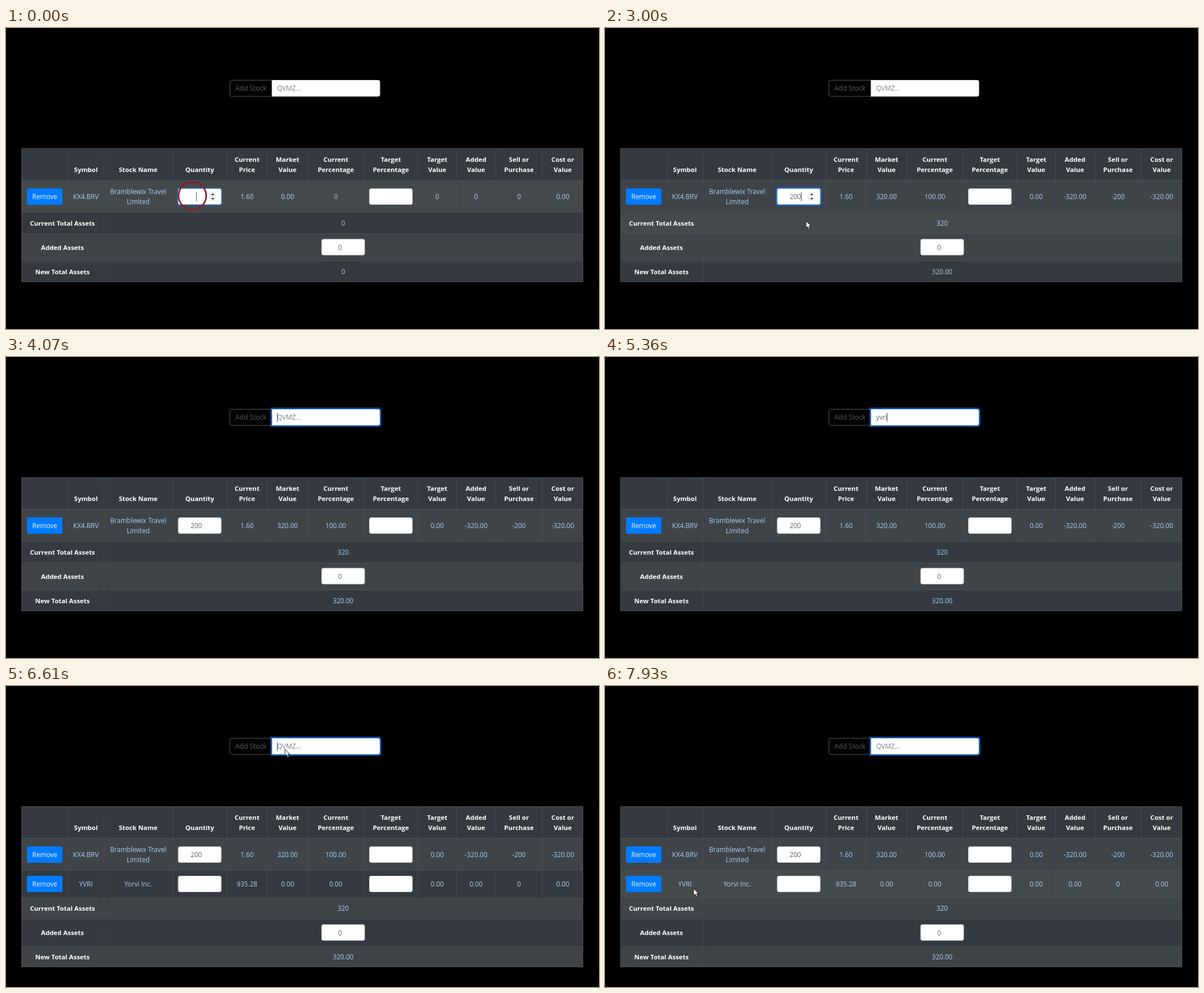
An HTML page with a canvas that plays this animation: 1050x533 px, repeating every 8 s.

```html
<!DOCTYPE html>
<html lang="en">
<head>
<meta charset="utf-8">
<title>Portfolio table</title>
<style>
html, body { margin: 0; width: 100%; height: 100%; overflow: hidden; background: #000; }
canvas { display: block; }
</style>
</head>
<body>
<canvas id="stage" width="1050" height="533"></canvas>
<script>
const ctx = document.getElementById('stage').getContext('2d');
const LOOP = 8000, BLINK = 535;
const FONT = '"Open Sans", "Noto Sans", sans-serif';
const BASE = '#343a40', STRIPE = '#3f4449', HOVER = '#444a4c', LINE = '#454c53';
const CELL = '#a9cdf2', INK = '#5d646b';

const cols = [27, 110, 173, 295, 391, 462.5, 534.5, 633.5, 729.5, 797.5, 867, 949.5, 1022];
const heads = ['', 'Symbol', 'Stock Name', 'Quantity', 'Current|Price', 'Market|Value',
  'Current|Percentage', 'Target|Percentage', 'Target|Value', 'Added|Value',
  'Sell or|Purchase', 'Cost or|Value'];
const mid = i => (cols[i] + cols[i + 1]) / 2;

// Typed text over time: [ms, content]
const qtyKeys = [[-35, ''], [1610, '2'], [1750, '20'], [1890, '200']];
const searchKeys = [[3925, ''], [4820, 'y'], [5060, 'yv'], [5210, 'yvr'], [5360, 'yvri'], [6255, '']];
// Pointer path: [ms, x, y]
const path = [[2820, 330, 297], [2900, 343, 322], [3000, 356, 342], [3140, 364, 341],
  [3330, 405, 252], [3500, 450, 154], [3610, 475, 126], [3750, 494, 112], [7040, 494, 112],
  [7220, 432, 190], [7420, 320, 306], [7640, 205, 372], [7820, 165, 367], [7910, 157, 359]];

const clamp = v => Math.max(0, Math.min(1, v));
const latest = (keys, t) => keys.filter(k => k[0] <= t).pop() || keys[0];
const caretOn = (key, t) => Math.floor((t - key[0]) / BLINK) % 2 === 0;

function pointerAt(t) {
  const n = path.findIndex(p => p[0] > t);
  if (n === 0) return path[0].slice(1);
  if (n < 0) return path[path.length - 1].slice(1);
  const a = path[n - 1], b = path[n], k = (t - a[0]) / (b[0] - a[0]);
  return [a[1] + (b[1] - a[1]) * k, a[2] + (b[2] - a[2]) * k];
}

function rect(x, y, w, h, fill) {
  ctx.fillStyle = fill;
  ctx.fillRect(x, y, w, h);
}

function box(x, y, w, h, r, fill, stroke, width = 1) {
  ctx.beginPath();
  ctx.roundRect(x, y, w, h, r);
  if (fill) { ctx.fillStyle = fill; ctx.fill(); }
  if (stroke) { ctx.strokeStyle = stroke; ctx.lineWidth = width; ctx.stroke(); }
}

function text(s, x, y, color = CELL, { bold, align = 'center', size = 11.7 } = {}) {
  ctx.font = `${bold ? 700 : 400} ${bold ? 11.45 : size}px ${FONT}`;
  ctx.textAlign = align;
  ctx.fillStyle = color;
  const lines = s.split('|');
  lines.forEach((l, i) => ctx.fillText(l, x, y + 4.2 + (i - (lines.length - 1) / 2) * 18.4));
  return ctx.measureText(s).width;
}

function caret(x, y) {
  rect(Math.round(x), y - 8, 1, 16, '#4a4f55');
}

function field(x, y, w, h, r, focus) {
  if (focus > 0) box(x - 1, y - 1, w + 2, h + 2, r, null, `rgba(20,105,225,${0.6 * focus})`, 3);
  box(x + .5, y + .5, w - 1, h - 1, r, '#fff', focus > 0 ? '#80bdff' : '#ced4da');
}

function spinner(x, y) {
  rect(x - 6, y - 8, 12, 16, '#efefef');
  ctx.fillStyle = '#4d4d4d';
  for (const d of [-1, 1]) {
    ctx.beginPath();
    ctx.moveTo(x - 3, y + d * 2.5);
    ctx.lineTo(x + 3, y + d * 2.5);
    ctx.lineTo(x, y + d * 6);
    ctx.fill();
  }
}

function removeButton(y) {
  box(37, y - 14.5, 63, 29, 3, '#007bff');
  text('Remove', 68.5, y, '#f2f8ff');
}

function searchBar(t, focused) {
  box(396.5, 92.5, 76, 28.5, [3, 0, 0, 3], '#000', '#51575c');
  text('Add Stock', 433.7, 107, '#555c63', { size: 12 });
  field(470.5, 92, 192, 29.5, [0, 3, 3, 0], focused ? clamp((t - 3900) / 150) : 0);
  const key = latest(searchKeys, t);
  const typed = focused ? key[1] : '';
  const w = text(typed || 'QVMZ...', 480, 107, typed ? INK : '#777f87', { align: 'left' });
  if (focused && caretOn(key, t)) caret(480 + (typed ? w : 0), 107);
}

function stockRow(y, cells) {
  removeButton(y);
  cells.forEach((c, i) => c && text(c, mid(i + 1), y));
  field(304.5, y - 14.5, 77, 29, 3, 0);
  field(643, y - 14.5, 77, 29, 3, 0);
}

function quantity(t, key, y) {
  const focused = t < 3200;
  if (focused) {
    field(304.5, y - 14.5, 77, 29, 3, .35 + .65 * clamp((t - 40) / 70));
    spinner(366, y);
  }
  const w = text(key[1], 337, y, INK);
  if (focused && caretOn(key, t)) caret(337 + w / 2, y);
}

function table(t, py) {
  const added = t >= 6610;
  const tops = added ? [270, 326, 375, 412, 461, 498] : [270, 326, 364, 412, 450];
  const rows = tops.length - 1, bottom = tops[rows];
  const stocks = rows - 3;

  rect(27, 213, 995, bottom - 213, BASE);
  for (let i = 0; i < rows; i++) {
    const hot = py >= tops[i] && py < tops[i + 1];
    rect(27, tops[i], 995, tops[i + 1] - tops[i], hot ? HOVER : i % 2 ? BASE : STRIPE);
  }
  for (const y of [213, ...tops]) rect(27, Math.min(y, bottom - 1), 995, 1, LINE);
  rect(27, 269, 995, 1, LINE);
  cols.forEach((x, i) => {
    const full = i === 0 || i === 2 || i === 12;
    rect(Math.min(Math.floor(x), 1021), 213, 1, (full ? bottom : tops[stocks]) - 213, LINE);
  });
  heads.forEach((h, i) => text(h, mid(i), h.includes('|') ? 242 : 251, '#fff', { bold: true }));

  const key = latest(qtyKeys, t), q = +key[1], sum = q * 1.6, money = sum.toFixed(2);
  stockRow(298.5, ['KX4.BRV', 'Bramblewix Travel|Limited', '', '1.60', money,
    ...(q ? ['100.00', '', '0.00', '-' + money, '-' + q, '-' + money] : ['0', '', '0', '0', '0', '0.00'])]);
  quantity(t, key, 298.5);
  if (added) {
    stockRow(350.5, ['YVRI', 'Yorvi Inc.', '', '935.28', '0.00', '0.00', '', '0.00', '0.00', '0', '0.00']);
  }

  const labels = ['Current Total Assets', 'Added Assets', 'New Total Assets'];
  const values = [String(+sum.toFixed(2)), '', q ? money : '0'];
  labels.forEach((label, i) => {
    const y = (tops[stocks + i] + tops[stocks + i + 1]) / 2 + .3;
    text(label, 100, y, '#fff', { bold: true });
    if (i === 1) {
      field(558.5, y - 14.8, 77, 29, 3, 0);
      text('0', 591.5, y + .5, INK);
    } else text(values[i], 597, y);
  });
}

function ring(x, y, alpha) {
  if (alpha <= 0) return;
  ctx.globalAlpha = alpha;
  ctx.strokeStyle = '#8c1c2b';
  ctx.lineWidth = 2.8;
  ctx.beginPath();
  ctx.arc(x, y, 24.5, 0, Math.PI * 2);
  ctx.stroke();
  ctx.globalAlpha = 1;
}

function arrow(x, y) {
  const pts = [[0, 0], [0, 12], [2.8, 9.5], [4.8, 13.8], [6.8, 12.9], [4.9, 8.8], [8.6, 8.6]];
  ctx.beginPath();
  pts.forEach(([dx, dy]) => ctx.lineTo(x + dx, y + dy));
  ctx.closePath();
  ctx.fillStyle = '#fff';
  ctx.fill();
  ctx.strokeStyle = '#111';
  ctx.lineWidth = .9;
  ctx.stroke();
}

function draw(t) {
  const [px, py] = pointerAt(t);
  rect(0, 0, 1050, 533, '#000');
  searchBar(t, t >= 3900);
  table(t, py);
  ring(330, 297, 1 - clamp((t - 40) / 70));
  if (t >= 3890) ring(494, 111, 1 - clamp((t - 3990) / 80));
  const inSearch = px > 471 && px < 662 && py > 92 && py < 122;
  const inQty = px > 305 && px < 381 && py > 284 && py < 313;
  const busy = t >= 6290 && t < 6790;
  if (busy || t > 2820 && !inSearch && !inQty) arrow(px, py);
}

const start = performance.now();
function tick() {
  draw((performance.now() - start) % LOOP);
  requestAnimationFrame(tick);
}
tick();
</script>
</body>
</html>
```
